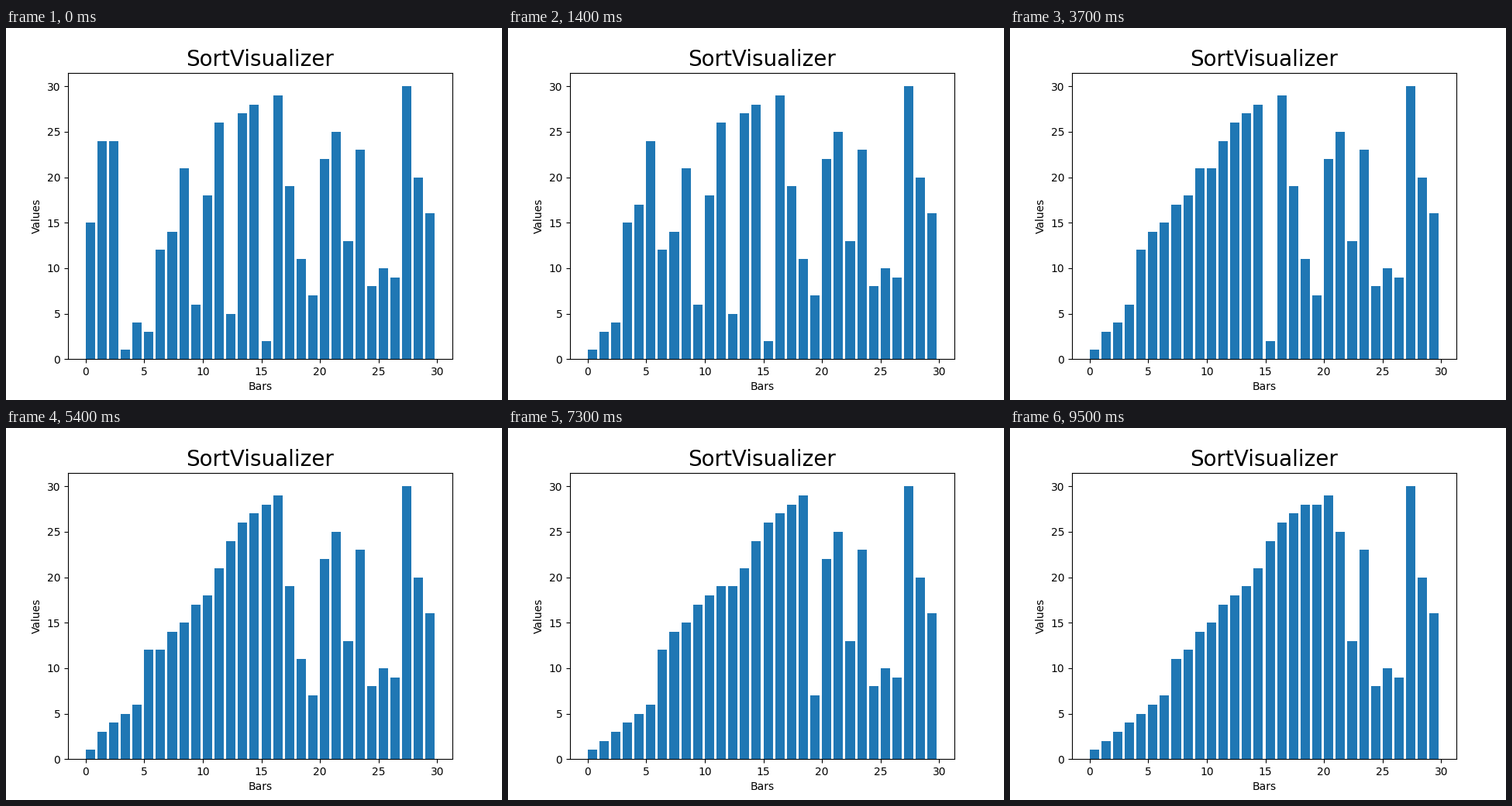
A matplotlib script that plays this animation: 640x480 px, repeating every 9600 ms.

```python
from itertools import islice

import matplotlib.pyplot as plt
from matplotlib.animation import FuncAnimation

FRAMES = 96
INTERVAL = 100

# The shuffled input; all motion follows from sorting it.
START = [15, 24, 17, 1, 4, 3, 12, 14, 21, 6, 18, 26, 5, 27, 28,
         2, 29, 19, 11, 7, 22, 25, 13, 23, 8, 10, 9, 30, 20, 16]


def insertion_sort(values):
    """Yield the list after every shift and after every key placement."""
    a = list(values)
    for i in range(1, len(a)):
        key, j = a[i], i
        while j > 0 and a[j - 1] > key:
            a[j] = a[j - 1]
            j -= 1
            yield a[:]
        if j < i:
            a[j] = key
            yield a[:]


states = list(islice(insertion_sort(START), FRAMES))

fig, ax = plt.subplots(figsize=(6.4, 4.8), dpi=100)
ax.set_title("SortVisualizer", fontsize=20)
ax.set_xlabel("Bars")
ax.set_ylabel("Values")
bars = ax.bar(range(len(START)), states[0], align="edge")
ax.set_ylim(0, 1.05 * max(START))


def draw(frame):
    for bar, height in zip(bars, states[frame]):
        bar.set_height(height)
    return bars.patches


anim = FuncAnimation(fig, draw, frames=FRAMES, interval=INTERVAL,
                     repeat=True, repeat_delay=0)
plt.show()
```
